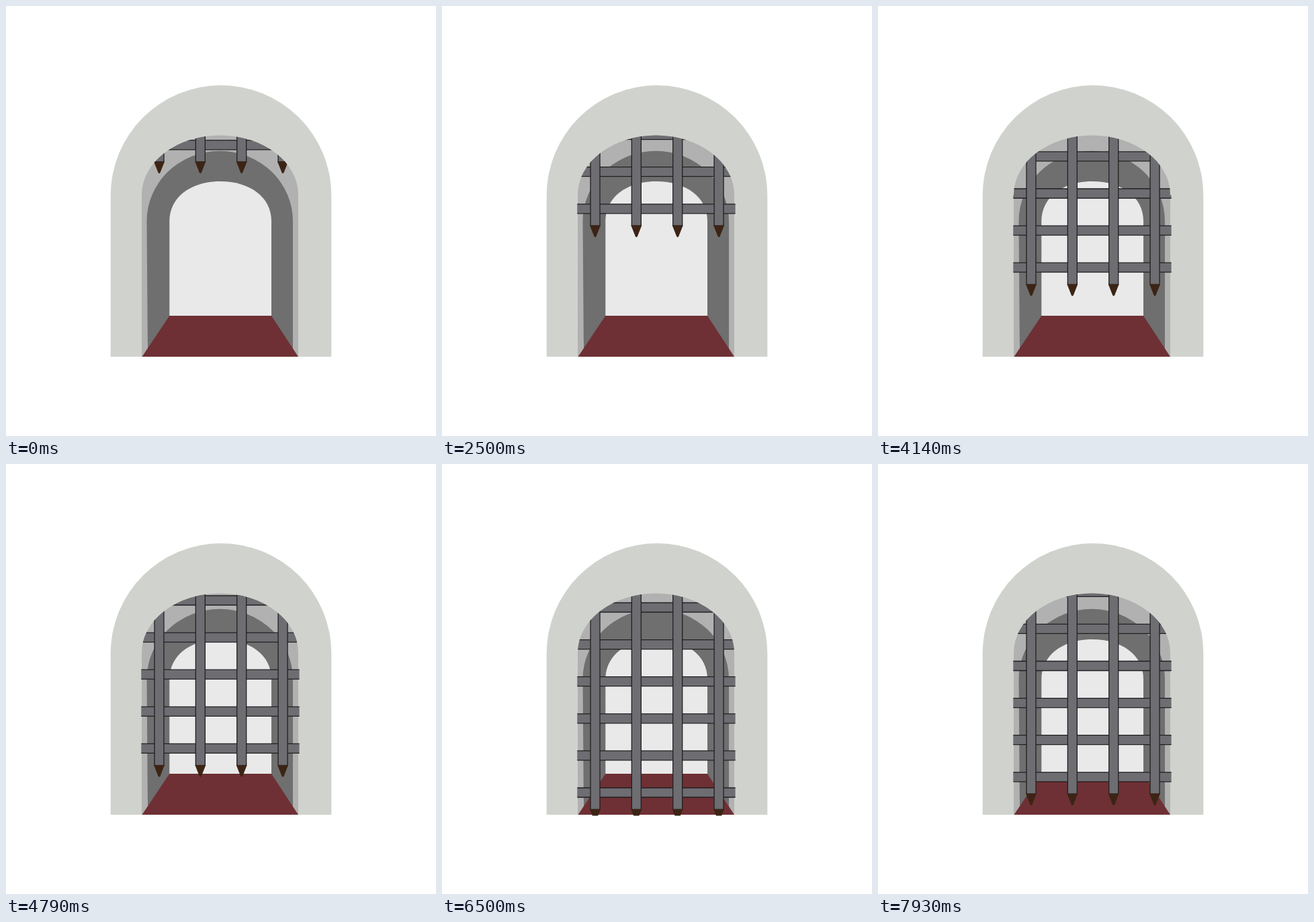
An HTML page that plays this animation: 640 px wide and 640 px high, repeating every 8 s.

```html
<!DOCTYPE html>
<html lang="en">
<head>
<meta charset="utf-8">
<title>Portcullis</title>
<style>
  html, body { margin: 0; width: 100%; height: 100%; overflow: hidden; background: #fff; }
  svg { display: block; width: 100%; height: 100%; }
</style>
</head>
<body>
<svg viewBox="0 0 640 640">
  <defs>
    <clipPath id="opening">
      <path d="M202 281A116.5 88.5 0 0 1 435 281L438 283V523.5H200V283Z"/>
    </clipPath>
  </defs>
  <path fill="#d0d3cd" d="M155.7 522V282A164.3 164 0 0 1 484.3 282V522Z"/>
  <path fill="#b1b1b1" d="M202 522V281A116.5 88.5 0 0 1 435 281V522Z"/>
  <path fill="#6f6f6f" d="M211 522L209.5 320A108.75 104.2 0 0 1 427 320V522Z"/>
  <path fill="#e9e9e9" d="M243.3 462V320C243.3 284 276 261 319 261S395 284 395 320V462Z"/>
  <path fill="#b1b1b1" d="M202 522V500H211V510L203 522ZM435 522V500H427V510Z"/>
  <path fill="#6e3034" d="M243.3 461H395L435 522H202.5Z"/>
  <g clip-path="url(#opening)"><g id="gate" stroke-width="1.3"></g></g>
</svg>
<script>
const LOOP = 8000, FPS = 14;
const gate = document.getElementById('gate');

// Gate is drawn with the top of its spikes at y = 0.
const crossBar = i => {
  const y = -25.2 - 55.1 * i;
  return `<path fill="#6d6d72" d="M201.3 ${y - 7}H436.6V${y + 7}H201.3Z"/>
    <path stroke="#231f20" d="M201.3 ${y - 7}H436.6M201.3 ${y + 7}H436.6"/>`;
};
const upright = i => `<g transform="translate(${228 + 61.35 * i} 0)">
  <rect x="-7" y="-326" width="14" height="326" fill="#6d6d72" stroke="#231f20"/>
  <path fill="#3c2415" d="M-8 -.5H8L1.6 15.8Q0 18.6 -1.6 15.8Z"/></g>`;
gate.innerHTML = [0, 1, 2, 3, 4, 5].map(crossBar).join('') + [0, 1, 2, 3].map(upright).join('');

// [step, height of the spike tops]: hold, lower, lift a little, lower again
const keys = [[0, 232], [10, 232], [87, 524.6], [106.5, 474], [112, 494.8]];

function gateY(step) {
  const k = keys.findIndex(([s]) => s > step);
  const [s0, y0] = keys[k - 1], [s1, y1] = keys[k];
  return y0 + (y1 - y0) * (step - s0) / (s1 - s0);
}

const start = performance.now();
function draw() {
  const t = (performance.now() - start) % LOOP;
  const step = Math.min(111, Math.floor(t * FPS / 1000 + 0.06));
  gate.setAttribute('transform', `translate(0 ${gateY(step)})`);
  requestAnimationFrame(draw);
}
draw();
</script>
</body>
</html>
```
